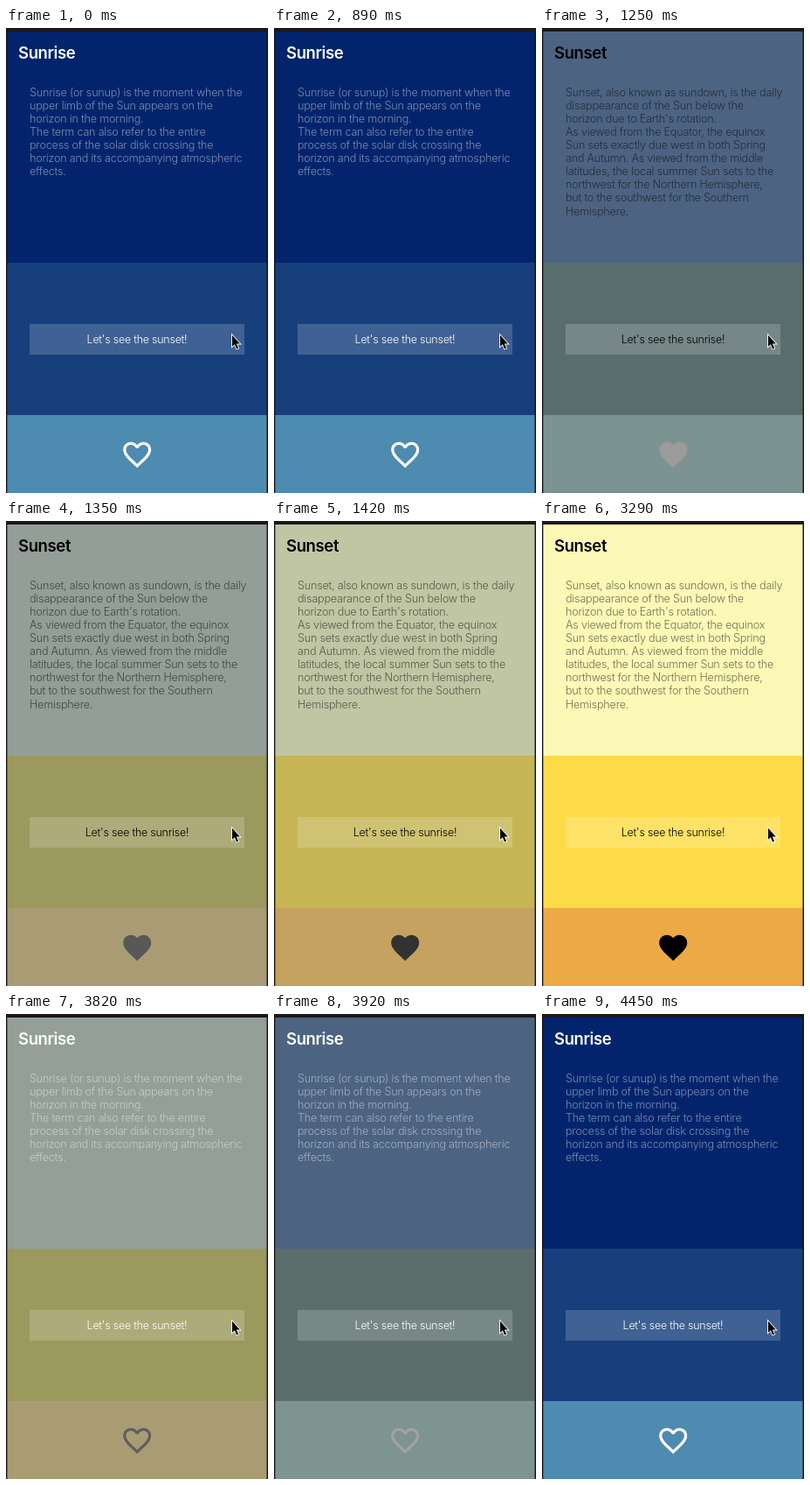
An HTML page that plays this animation: 300x531 px, repeating every 4.48 s.

```html
<!DOCTYPE html>
<html lang="en">
<head>
<meta charset="utf-8">
<title>Sunrise and sunset</title>
<style>
html, body {
  margin: 0;
  width: 100%;
  height: 100%;
  overflow: hidden;
  background: #1b171a;
}
body {
  position: relative;
  font-family: Inter, Roboto, sans-serif;
}
body * { position: absolute; }
br { position: static; }

.band {
  left: 1px;
  width: 298px;
  box-shadow: inset 1px 0 rgba(27, 23, 26, .4), inset -1px 0 rgba(27, 23, 26, .5);
  animation: blend 4480ms infinite;
}
.sky  { top: 4px;   height: 264px; --rise: #03246c; --set: #fcf9b6; }
.glow { top: 268px; height: 174px; --rise: #163f7c; --set: #fddb48; }
.land { top: 442px; height: 89px;  --rise: #4d8bb1; --set: #eda946; }

.button {
  left: 27px;
  top: 337.5px;
  width: 246px;
  height: 35px;
  background: rgba(255, 255, 255, .175);
}

.scene {
  inset: 0;
  animation: 4480ms step-end infinite;
}
.sunrise { color: #fff; --fade: .47; animation-name: show-rise; }
.sunset  { color: #000; --fade: .55; animation-name: show-set; }

h1, p, .label { margin: 0; white-space: nowrap; }
h1 {
  left: 14px;
  top: 17px;
  font-size: 18.5px;
  font-weight: 600;
  line-height: 23px;
  letter-spacing: -.38px;
}
p {
  left: 27px;
  top: 65.7px;
  font-size: 12.6px;
  font-weight: 300;
  line-height: 15.1px;
  letter-spacing: -.215px;
  opacity: var(--fade);
}
.label {
  left: 27px;
  top: 337.5px;
  width: 246px;
  text-align: center;
  font-size: 12.4px;
  font-weight: 300;
  line-height: 35px;
  letter-spacing: -.2px;
}
.heart {
  left: 130.8px;
  top: 468px;
  width: 38.4px;
  height: 38.4px;
  animation: tint 4480ms infinite;
}
.cursor { left: 0; top: 0; }

/* Sunset fades in over 1025-1625 ms and out over 3548-4148 ms. */
@keyframes blend {
  0% { background: var(--rise); }
  22.88% { background: var(--rise); animation-timing-function: ease-in-out; }
  36.27% { background: var(--set); }
  79.2% { background: var(--set); animation-timing-function: ease-in-out; }
  92.59%, 100% { background: var(--rise); }
}
@keyframes tint {
  0% { fill: #fff; }
  22.88% { fill: #fff; animation-timing-function: cubic-bezier(.3, 0, .55, 1); }
  36.27% { fill: #000; }
  79.2% { fill: #000; animation-timing-function: cubic-bezier(.42, 0, .68, 1); }
  92.59%, 100% { fill: #fff; }
}
@keyframes show-rise {
  0%, 79.2%, 100% { visibility: visible; }
  22.88% { visibility: hidden; }
}
@keyframes show-set {
  0%, 79.2%, 100% { visibility: hidden; }
  22.88% { visibility: visible; }
}
</style>
</head>
<body>
<div class="band sky"></div>
<div class="band glow"></div>
<div class="band land"></div>
<div class="button"></div>

<section class="scene sunrise">
  <h1>Sunrise</h1>
  <p>Sunrise (or sunup) is the moment when the<br>
  upper limb of the Sun appears on the<br>
  horizon in the morning.<br>
  The term can also refer to the entire<br>
  process of the solar disk crossing the<br>
  horizon and its accompanying atmospheric<br>
  effects.</p>
  <div class="label">Let's see the sunset!</div>
  <svg class="heart" viewBox="0 0 24 24"><path d="M16.5 3c-1.74 0-3.41.81-4.5 2.09C10.91 3.81 9.24 3 7.5 3 4.42 3 2 5.42 2 8.5c0 3.78 3.4 6.86 8.55 11.54L12 21.35l1.45-1.32C18.6 15.36 22 12.28 22 8.5 22 5.42 19.58 3 16.5 3zm-4.4 15.55l-.1.1-.1-.1C7.14 14.24 4 11.39 4 8.5 4 6.5 5.5 5 7.5 5c1.54 0 3.04.99 3.57 2.36h1.87C13.46 5.99 14.96 5 16.5 5c2 0 3.5 1.5 3.5 3.5 0 2.89-3.14 5.74-7.9 10.05z"/></svg>
</section>

<section class="scene sunset">
  <h1>Sunset</h1>
  <p>Sunset, also known as sundown, is the daily<br>
  disappearance of the Sun below the<br>
  horizon due to Earth's rotation.<br>
  As viewed from the Equator, the equinox<br>
  Sun sets exactly due west in both Spring<br>
  and Autumn. As viewed from the middle<br>
  latitudes, the local summer Sun sets to the<br>
  northwest for the Northern Hemisphere,<br>
  but to the southwest for the Southern<br>
  Hemisphere.</p>
  <div class="label">Let's see the sunrise!</div>
  <svg class="heart" viewBox="0 0 24 24"><path d="M12 21.35l-1.45-1.32C5.4 15.36 2 12.28 2 8.5 2 5.42 4.42 3 7.5 3c1.74 0 3.41.81 4.5 2.09C13.09 3.81 14.76 3 16.5 3 19.58 3 22 5.42 22 8.5c0 3.78-3.4 6.86-8.55 11.54L12 21.35z"/></svg>
</section>

<svg class="cursor" width="300" height="531">
  <path d="M259 350.8V363.8L261.8 361.2L264.1 366.4L266 365.6L263.8 360.6H267.8Z" fill="#000" stroke="#fff" stroke-width="1.8" paint-order="stroke"/>
</svg>
</body>
</html>
```
